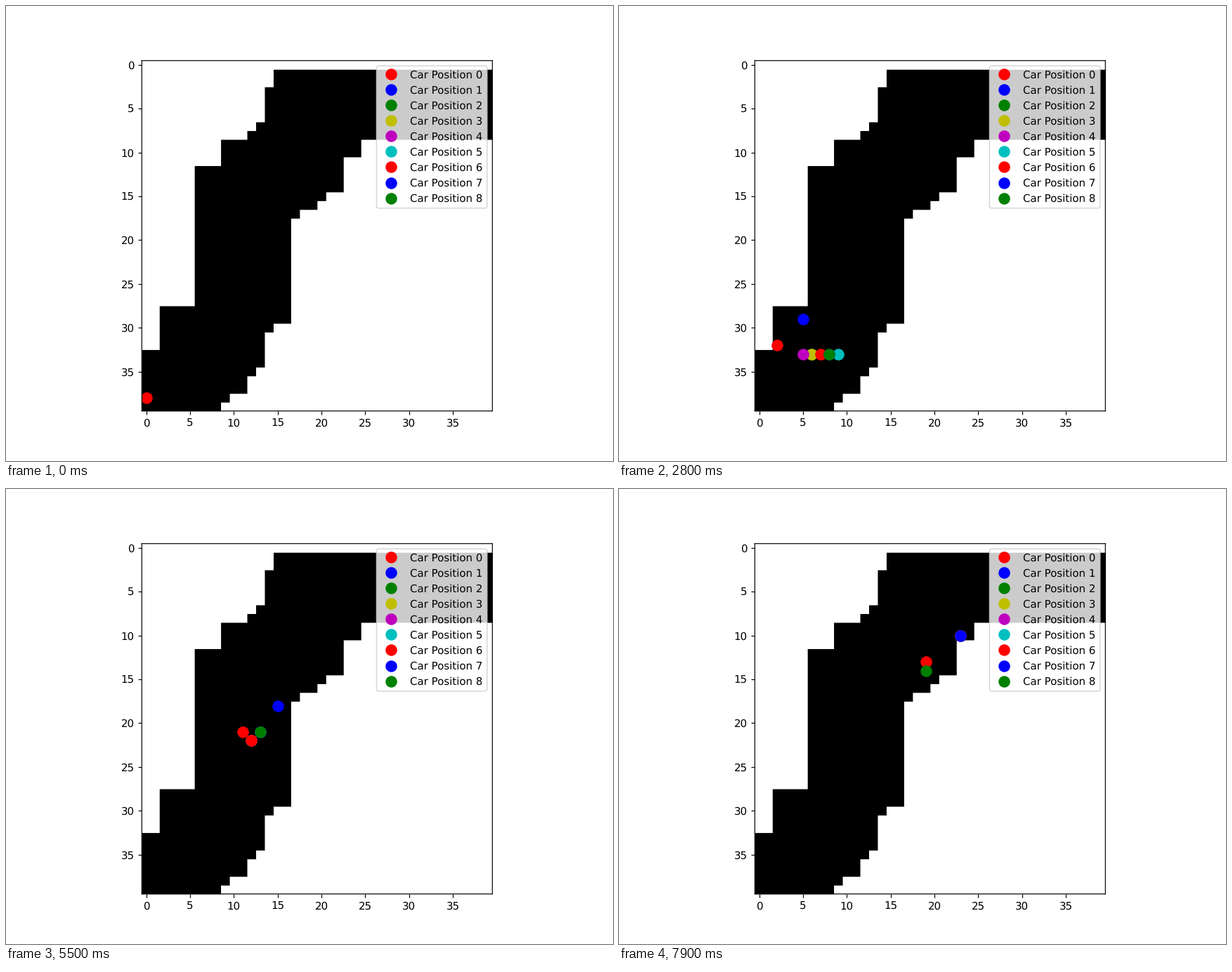
Recreate the animation shown at these times as a matplotlib script. Size 864 by 648 pixels, loop 8000 ms.

```python
import numpy as np
import matplotlib.pyplot as plt
from matplotlib.animation import FuncAnimation

# Smooth, unhinted drawing at fractional pixel positions
plt.rcParams.update({"path.snap": False, "text.hinting": "no_hinting"})

SIZE = 40
FRAMES = 80
INTERVAL = 100
CARS = 9
COLORS = "rbgymc"
START_Y, FINISH_Y = 38, 10
LAST_TURN = 8

# Corners of the track: first row -> column, held until the next corner
LEFT = {1: 15, 3: 14, 7: 13, 8: 12, 9: 9, 12: 6, 28: 2, 33: 0}
RIGHT = {1: 40, 9: 25, 11: 23, 15: 21, 16: 20, 17: 18, 18: 17,
         30: 15, 31: 14, 35: 13, 36: 12, 38: 10, 39: 9}


def edge(corners, row):
    return corners[max(r for r in corners if r <= row)] - 0.5


def climb(turn, ease):
    """Row of a car that pulls away softly, then keeps its speed."""
    def run(t):
        return np.hypot(t, ease) - ease
    return START_Y + (FINISH_Y - START_Y) * run(turn) / run(LAST_TURN)


def lane(turn, start, drift):
    return start + drift * turn + 0.28125 * turn ** 2


def inner(turn):
    return lane(turn, 6, -0.125)


def outer(turn):
    return lane(turn, 8, -0.375)


def racer(line, ease, offset=0, steer=0, merge=4):
    """A car that starts beside a lane and has joined it after `merge` turns."""
    def place(turn):
        fade = max(1 - turn / merge, 0) * (1 + steer * turn)
        return line(turn) + offset * fade, climb(turn, ease)
    return place


def late(turn):
    """The car that hugs the left side and speeds up last."""
    x = 3.2 * np.logaddexp(0, (turn - 3.25) / 0.8)
    return x, START_Y - 2 * turn - 2 * max(turn - 3.5, 0)


RACERS = [
    late,
    racer(inner, 0.7, -5, 0.05, merge=6),
    racer(inner, 1.1, -3, -0.1),
    racer(inner, 1.1, -3, -0.1),
    racer(inner, 1.1, -2, 0.25),
    racer(outer, 0.7, -2, -0.65),
    racer(inner, 1.1),
    racer(outer, 0.7, -1, -0.1),
    racer(outer, 0.7),
]

fig, ax = plt.subplots(figsize=(8, 6), dpi=108)
ax.set(xlim=(-0.5, SIZE - 0.5), ylim=(SIZE - 0.5, -0.5), aspect="equal",
       xticks=range(0, SIZE, 5), yticks=range(0, SIZE, 5))
rows = np.arange(1, SIZE + 1)
ax.fill_betweenx(rows - 0.5, [edge(LEFT, r) for r in rows],
                 [edge(RIGHT, r) for r in rows],
                 step="post", color="black", linewidth=0)

dots = [ax.plot([], [], COLORS[i % len(COLORS)] + "o", markersize=10,
                label=f"Car Position {i}")[0] for i in range(CARS)]
ax.legend(loc="upper right")


def update(frame):
    # One car moves per frame, in turn; a car is unseen before its first turn
    for i, (dot, place) in enumerate(zip(dots, RACERS)):
        turn = (frame - i) // CARS
        if turn < 0:
            dot.set_data([], [])
        else:
            x, y = np.round(place(turn))
            dot.set_data([x], [y])
    return dots


anim = FuncAnimation(fig, update, frames=FRAMES, interval=INTERVAL,
                     repeat=True, repeat_delay=0, blit=False)
plt.show()
```
